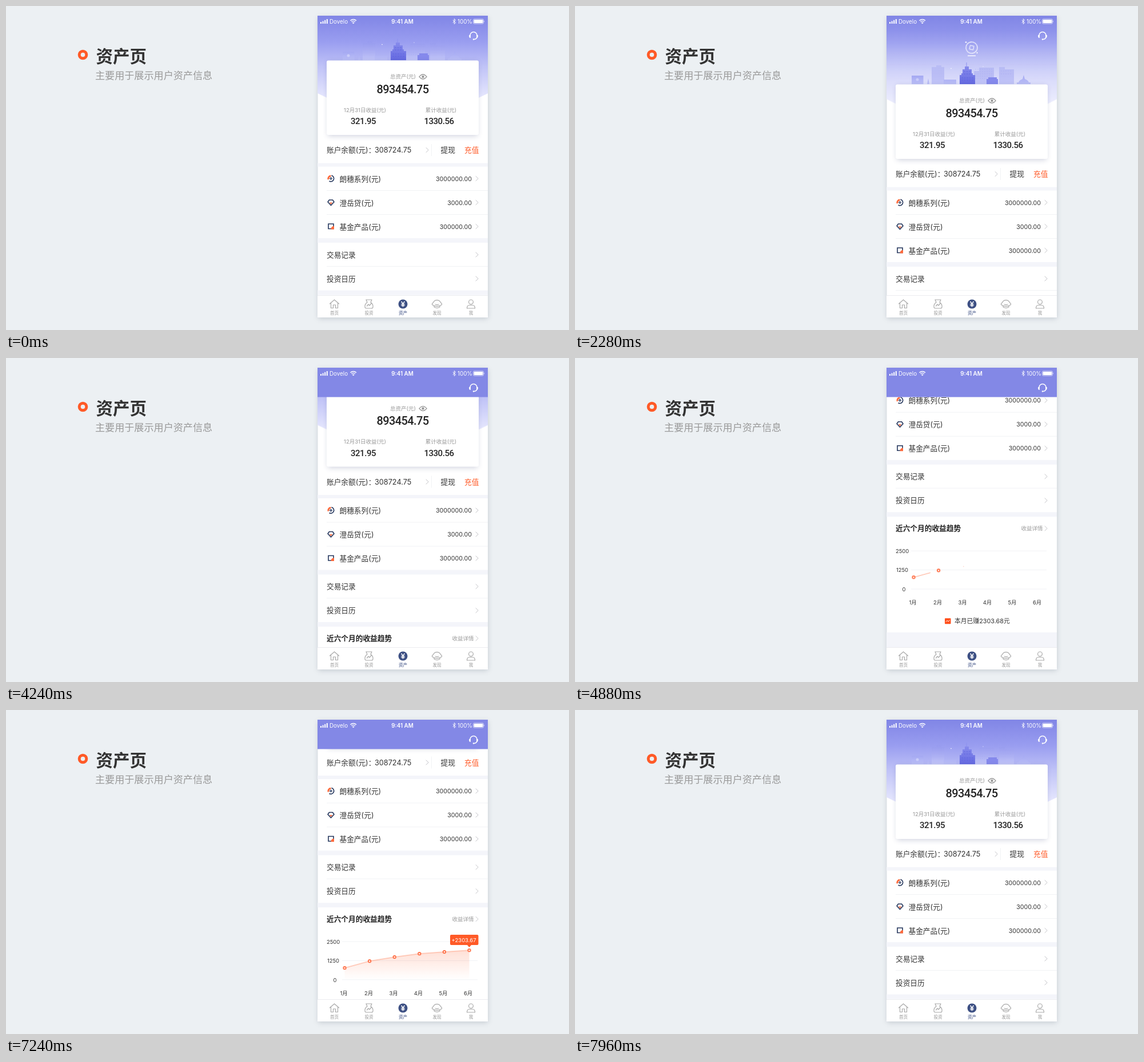
These frames come from a looping animation (985 px wide and 568 px high, 8.04 s). An HTML page:

```html
<!DOCTYPE html>
<html lang="zh-CN">
<head>
<meta charset="utf-8">
<title>资产页</title>
<style>
html, body { margin: 0; width: 100%; height: 100%; overflow: hidden; background: #ecf0f3; }
svg { display: block; }
#stage { width: 985px; height: 568px; }
text { font-family: Inter, "Noto Sans CJK SC", "Noto Sans CJK", sans-serif; font-size: 12.7px; fill: #333; }
.din { font: 500 15px Roboto, sans-serif; letter-spacing: -.03em; fill: #222; text-anchor: middle; }
.big { font-size: 20px; }
.num { font-size: 10.7px; text-anchor: end; }
.note { font-size: 9.5px; fill: #999; }
.mid { text-anchor: middle; }
.axis { font-size: 9.4px; text-anchor: middle; }
.status { font-size: 9.8px; fill: #fff; }
.tab { font-size: 7.6px; fill: #999; text-anchor: middle; }
.line { fill: none; stroke: #f1f2f5; }
.icon { fill: none; stroke: #a9a9a9; stroke-width: 1.2; stroke-linejoin: round; stroke-linecap: round; }
.white { fill: none; stroke: #fff; }
.mark { fill: none; stroke: #24365c; stroke-width: 1.6; }

/* one loop = 8040 ms; cubic-bezier below is smoothstep */
.a { animation: 8040ms cubic-bezier(.333, 0, .667, 1) infinite both; }
#scroll { animation-name: scroll; }
#sky { animation-name: sky; transform-origin: 694px 18px; }
#mist { animation-name: mist; }
#city { animation-name: city; transform-origin: 692px 95px; }
#bar { animation-name: bar; }
#loader { animation-name: loader; }
#ring { animation-name: ring; animation-timing-function: linear; }
#coin { animation-name: coin; }
#ground { animation-name: ground; }
.spark { animation-name: spark; }
.dot { animation-name: pop; transform-box: fill-box; transform-origin: center; }
#trend { animation-name: draw; animation-timing-function: linear; stroke-dasharray: 100; }
#area { animation-name: area; }
#tip { animation-name: tip; transform-origin: 810.5px 577px; }

@keyframes scroll {
  0%, 5.35% { transform: translateY(0); }
  11.2% { transform: translateY(50px); }
  15.42%, 37.19% { transform: translateY(42px); }
  42.29%, 50.27% { transform: translateY(0); }
  60.22%, 86.47% { transform: translateY(-228.3px); }
  96.42%, 100% { transform: translateY(0); }
}
@keyframes sky {
  0%, 5.35% { transform: translateY(0) scaleY(1); }
  11.2%, 15.92% { transform: translateY(0) scaleY(1.22); }
  25.87%, 37.19% { transform: translateY(0) scaleY(1.074); }
  42.29%, 50.27% { transform: translateY(0) scaleY(1); }
  60.22%, 86.47% { transform: translateY(-228.3px) scaleY(1); }
  96.42%, 100% { transform: translateY(0) scaleY(1); }
}
@keyframes mist {
  0%, 5.35% { opacity: 0; }
  11.2%, 15.92% { opacity: .75; }
  25.87%, 37.19% { opacity: .3; }
  42.29%, 100% { opacity: 0; }
}
@keyframes city {
  0%, 5.35% { transform: scale(1); }
  11.2%, 15.92% { transform: scale(1.04); }
  25.87%, 100% { transform: scale(1); }
}
@keyframes bar {
  0%, 50.2% { opacity: 0; }
  51.8%, 96.8% { opacity: 1; }
  99%, 100% { opacity: 0; }
}
@keyframes loader {
  0%, 5.35% { transform: translateY(-33.6px); opacity: 0; }
  11.2% { transform: translateY(6.4px); opacity: 1; }
  15.42%, 37.19% { transform: translateY(0); opacity: 1; }
  42.29%, 100% { transform: translateY(-33.6px); opacity: 0; }
}
@keyframes ring {
  0%, 5.35% { stroke-dasharray: 0 31.42; transform: rotate(-250deg); }
  11.94% { stroke-dasharray: 25 6.42; transform: rotate(-61deg); }
  15.92%, 100% { stroke-dasharray: 31.42 0; transform: rotate(60deg); }
}
@keyframes coin {
  0%, 15.92% { transform: rotate(-90deg) scale(0); }
  20.5%, 26.87% { transform: rotate(0deg) scale(1); }
  36.32%, 100% { transform: rotate(180deg) scale(1); }
}
@keyframes ground {
  0%, 19.5% { transform: scaleX(0); }
  25.87%, 100% { transform: scaleX(1); }
}
@keyframes spark {
  0%, 21% { opacity: 0; }
  25.87%, 29% { opacity: 1; }
  32% { opacity: .3; }
  36.32%, 100% { opacity: 1; }
}
@keyframes pop {
  0%, 57.59% { transform: scale(0); }
  59.45%, 100% { transform: scale(1); }
}
@keyframes draw {
  0%, 59.58% { stroke-dashoffset: 100; }
  67.79%, 100% { stroke-dashoffset: 0; }
}
@keyframes area {
  0%, 65.5% { opacity: 0; }
  70.65%, 100% { opacity: 1; }
}
@keyframes tip {
  0%, 67.79% { transform: scale(0); }
  70.65%, 100% { transform: scale(1); }
}
</style>
</head>
<body>
<svg id="stage" viewBox="0 0 985 568">
  <defs>
    <clipPath id="screen"><path d="M545.5 17.5h297.5v528.5h-297.5z"/></clipPath>
    <linearGradient id="dusk" gradientUnits="userSpaceOnUse" x1="0" y1="18" x2="0" y2="165">
      <stop stop-color="#8186e6"/><stop offset=".3" stop-color="#999df0"/><stop offset=".6" stop-color="#c0c3f7"/><stop offset="1" stop-color="#e9eafe"/>
    </linearGradient>
    <linearGradient id="fade" gradientUnits="userSpaceOnUse" x1="0" y1="40" x2="0" y2="125">
      <stop stop-color="#fff" stop-opacity="0"/><stop offset="1" stop-color="#fff"/>
    </linearGradient>
    <linearGradient id="tower" x2="0" y2="1"><stop stop-color="#8f93ee"/><stop offset="1" stop-color="#6469e1"/></linearGradient>
    <linearGradient id="block" x2="0" y2="1"><stop stop-color="#a3a7f2"/><stop offset="1" stop-color="#bcc0f7"/></linearGradient>
    <linearGradient id="haze" x2="0" y2="1"><stop stop-color="#9296ec" stop-opacity=".25"/><stop offset="1" stop-color="#c3c6f8"/></linearGradient>
    <linearGradient id="glow" x2="0" y2="1"><stop stop-color="#ff5a27" stop-opacity=".19"/><stop offset="1" stop-color="#ff5a27" stop-opacity="0"/></linearGradient>
    <filter id="soft" x="-20%" y="-20%" width="140%" height="140%"><feGaussianBlur stdDeviation="5"/></filter>
    <path id="chev" d="M-2.3-4.3L2.2 0-2.3 4.3" fill="none" stroke="#c4c4c8"/>
    <circle id="node" r="2.3" fill="#fff" stroke="#ff4f1c" stroke-width="1.4"/>
    <path id="shore" d="M545-60h298.500v213l-149 71-149.500-71z"/>
  </defs>

  <circle cx="134.5" cy="85.5" r="6.3" fill="none" stroke="#ff5a27" stroke-width="5"/>
  <text x="157.5" y="98.5" style="font-size:29.5px;font-weight:700">资产页</text>
  <text x="156" y="127.5" style="font-size:17.1px;fill:#999">主要用于展示用户资产信息</text>

  <path d="M546 20h297v528h-297z" filter="url(#soft)" fill="#6b7684" opacity=".3"/>
  <g clip-path="url(#screen)">
    <path d="M545 17h298v529h-298z" fill="#fff"/>
    <g id="sky" class="a">
      <use href="#shore" fill="url(#dusk)"/>
      <use id="mist" class="a" href="#shore" fill="url(#fade)"/>
    </g>

    <g id="loader" class="a">
      <g transform="translate(694 73)" class="white">
        <circle id="ring" class="a" r="10" stroke-width="1.2"/>
        <path id="coin" class="a" d="M-3.3-3.3h6.6v6.6h-6.6z"/>
        <path id="ground" class="a" d="M-7 14.3h14" stroke-width="1.3"/>
        <path class="a spark" d="M-11.5-9.5h3M-10-11v3M8.3 9h2.4M9.5 7.8v2.4"/>
      </g>
    </g>

    <g id="scroll" class="a">
      <g id="city" class="a">
        <path fill="url(#haze)" d="M624 95V65h8v-3h9v3h5v30zM698 95V72h9v-6h26v29zM742 95V65h10v4h16v26z"/>
        <path d="M700 69h31M700 73h31M700 77h31M700 81h31M700 85h18M745 72h20M745 77h20" stroke="#a3a7f3" stroke-dasharray="2 2" opacity=".45"/>
        <path fill="url(#block)" d="M589 95V80h20.500v15zM616 95l2-10 2 10zM645 95v-8h22v8zM773 95v-3h3q1-4 7-6l2-7 2 7q6 2 7 6h3v3z"/>
        <circle cx="599" cy="87" r="2.500" fill="#c9ccf9"/>
        <path fill="#8589ec" d="M720 95v-9h3v-3h15v3h2v9z"/>
        <path fill="url(#tower)" d="M673 95V79h3v-3h2V69h4v-5h2.500v-7h1v7h3.500v5h5v7h2v3h4v16z"/>
        <path d="M676 84h21M676 88h21M680 73h13M680 77h13" stroke="#5c60dc" stroke-width=".8" stroke-dasharray="3 1.500"/>
        <circle cx="658" cy="67.500" r=".8" fill="#fff"/><circle cx="714" cy="64" r=".6" fill="#fff"/>
      </g>

      <rect x="563" y="98" width="262" height="130" rx="3" filter="url(#soft)" fill="#59608c" opacity=".28"/>
      <rect x="561" y="95.500" width="266" height="130.500" rx="3" fill="#fff"/>
      <text class="note" x="672" y="127">总资产(元)</text>
      <path d="M723 124q6.500-8 13 0q-6.500 8-13 0z" fill="none" stroke="#999" stroke-width="1.300"/>
      <circle cx="729.500" cy="124" r="2.200" fill="#999"/>
      <text class="din big" x="694" y="152.700">893454.75</text>
      <text class="note mid" x="628" y="185.500">12月31日收益(元)</text>
      <text class="note mid" x="761" y="185.500">累计收益(元)</text>
      <text class="din" x="625" y="207.200">321.95</text>
      <text class="din" x="757.500" y="207.200">1330.56</text>

      <text x="561" y="257.200">账户余额(元)：</text>
      <text x="645" y="257.200">308724.75</text>
      <use href="#chev" x="737" y="252.500"/>
      <path class="line" d="M744.500 242v21"/>
      <text x="760.500" y="257.200">提现</text>
      <text x="802" y="257.200" style="fill:#ff5a27">充值</text>

      <path fill="#f4f5fa" d="M545 275.500h298v6h-298zM545 407h298v8h-298zM545 498.500h298v8h-298zM545 709.300h298v60h-298z"/>
      <path class="line" d="M561 323.500h282M561 365.500h282M561 456.500h282"/>

      <g transform="translate(568.500 302.500)">
        <path class="mark" d="M1-5.400A5.400 5.400 0 1 1-3 4.500"/>
        <path d="M-5.800 2A6 6 0 0 1 0-6L0-3A3 3 0 0 0-3 1z" fill="#ff6a3c"/>
        <path d="M0-2.600L2.600 0 0 2.600-2.600 0z" fill="#24365c"/><circle r=".8" fill="#fff"/>
      </g>
      <g transform="translate(568.500 344.500)">
        <path d="M-2.800 0h5.600L0 3.200z" fill="#ff6a3c"/>
        <path class="mark" d="M-3-4.500h6L5.500-1 0 5-5.500-1z" stroke-linejoin="round"/>
      </g>
      <g transform="translate(568.500 386.500)">
        <path class="mark" d="M-4.500-4.500h9v8.500h-9z"/>
        <path d="M5.500-.5v5.500h-5.500q0-5.500 5.500-5.500z" fill="#ff6a3c"/>
      </g>
      <text x="583.500" y="307.500">朗穗系列(元)</text>
      <text x="583.500" y="349.500">澄岳贷(元)</text>
      <text x="583.500" y="391.500">基金产品(元)</text>
      <text class="num" x="815" y="306.700">3000000.00</text>
      <text class="num" x="815" y="348.700">3000.00</text>
      <text class="num" x="815" y="390.700">300000.00</text>
      <text x="561" y="440.700">交易记录</text>
      <text x="561" y="482.700">投资日历</text>
      <use href="#chev" x="824" y="302.500"/><use href="#chev" x="824" y="344.500"/>
      <use href="#chev" x="824" y="386.500"/><use href="#chev" x="824" y="436"/>
      <use href="#chev" x="824" y="478"/><use href="#chev" x="824" y="527"/>

      <text x="561" y="531.700" style="font-weight:700;fill:#222">近六个月的收益趋势</text>
      <text class="note" x="780.500" y="530.500">收益详情</text>
      <path class="line" d="M588 566.500h237M588 599.800h237M588 633.300h237"/>
      <text class="axis" x="572.500" y="570">2500</text>
      <text class="axis" x="572.500" y="603.500">1250</text>
      <text class="axis" x="575.500" y="637">0</text>
      <g id="months"></g>
      <path id="area" class="a" fill="url(#glow)"/>
      <path id="trend" class="a" fill="none" stroke="#ffa184" pathLength="100"/>
      <g id="dots"></g>
      <g id="tip" class="a">
        <path d="M779 554.600h45.500a2 2 0 0 1 2 2v14a2 2 0 0 1-2 2h-10.500l-3.500 4-3.500-4h-28a2 2 0 0 1-2-2v-14a2 2 0 0 1 2-2z" fill="#ff5a27"/>
        <text id="gain" x="779.500" y="567.300" style="font-size:9.500px;fill:#fff">+2303.67</text>
      </g>
      <rect x="647" y="684.500" width="10.500" height="10" rx="1" fill="#ff4f1c"/>
      <path class="white" d="M648.800 691l2.300-2.500 2 1.800 2.800-2.600"/>
      <text x="664" y="693.800" style="font-size:10.800px">本月已赚2303.68元</text>
    </g>

    <path id="bar" class="a" d="M545 17h298v51.500h-298z" fill="#8388e6"/>
    <path d="M550 28h2v3h-2zM553.600 26.500h2v4.500h-2zM557.200 24.800h2v6.200h-2zM560.800 23h2v8h-2z" fill="#fff"/>
    <text class="status" x="566" y="30.700">Dovelo</text>
    <path class="white" stroke-width="1.400" d="M602.500 25.600q5.200-4.400 10.400 0M604.400 27.700q3.300-2.700 6.600 0"/>
    <path d="M605.700 29.300q2-1.500 4 0l-2 2z" fill="#fff"/>
    <text class="status mid" x="693.500" y="30.700" style="font-weight:600">9:41 AM</text>
    <path class="white" stroke-width=".9" d="M781.700 24.700l5 4.500-2.500 2.300v-9l2.500 2.300-5 4.500"/>
    <text class="status" x="790" y="30.700">100%</text>
    <rect class="white" x="817.500" y="22.800" width="18" height="8.400" rx="2" stroke-width=".6"/>
    <rect x="818.600" y="23.900" width="15.800" height="6.200" rx="1" fill="#fff"/>
    <path d="M836.300 25.500q1.500 1.500 0 3z" fill="#fff"/>
    <g transform="translate(818 52)">
      <path class="white" stroke-width="1.500" d="M-6 1v-1.500a6 6 0 0 1 12 0V1M6 3q-1 3-5 3.500"/>
      <path d="M-7.800-1h2.600v5h-1q-1.600-1-1.600-2.500zM7.800-1h-2.600v5h1q1.600-1 1.600-2.500z" fill="#fff"/>
      <circle cy="6.500" r="1.200" fill="#fff"/>
    </g>

    <path d="M545 507h298v39h-298z" fill="#fff"/>
    <path d="M545 507.500h298" stroke="#ececf0"/>
    <g class="icon">
      <path transform="translate(574.500 522.500)" d="M-8-.5L0-7.500 8-.5M-6-2v9h4V1.500h4V7h4v-9"/>
      <path transform="translate(635 522.500)" d="M-5-7.500h10l-2 4.500q4.500 3 4 8 0 2.500-2.500 2.500h-9q-2.500 0-2.500-2.500-.5-5 4-8zM-3.500 3.500L-1 .5l2 2L4-1"/>
      <g transform="translate(754 522.500)"><path d="M-6.500-2.500a7 7 0 0 1 13 0M-5.500 4.300a7 7 0 0 0 11 0M-6.500-2.500Q-10 0-7.500 1.800 0 6 7.500 1.800 10 0 6.500-2.500"/><path d="M-3 .5q3 1.200 6 0"/></g>
      <g transform="translate(813.500 522.500)"><circle cy="-3.600" r="3.900"/><path d="M-7 7.500q0-5.500 4.500-5.500h5q4.500 0 4.500 5.500z"/></g>
    </g>
    <circle cx="694.500" cy="522.500" r="8" fill="#3c4f83"/>
    <path class="white" stroke-width="1.400" d="M691.500 518l3 4 3-4M694.500 522v5.500M691.500 522.800h6M691.500 525.200h6"/>
    <text class="tab" x="574.500" y="541">首页</text>
    <text class="tab" x="635" y="541">投资</text>
    <text class="tab" x="694.500" y="541" style="fill:#3c4f83">资产</text>
    <text class="tab" x="754" y="541">发现</text>
    <text class="tab" x="813.500" y="541">我</text>
  </g>
</svg>
<script>
const $ = id => document.getElementById(id);
const heights = [612.7, 600.7, 593.6, 587.7, 584.6, 581.7];
const points = heights.map((y, i) => [592.5 + 43.6 * i, y]);
const path = 'M' + points.map(p => p.join(' ')).join('L');

$('trend').setAttribute('d', path);
$('area').setAttribute('d', path + 'V633.3H592.5z');
$('dots').innerHTML = points.map(([x, y], i) =>
  `<g transform="translate(${x} ${y})"><use href="#node" class="a dot" style="animation-delay:${105 * i}ms"/></g>`).join('');
$('months').innerHTML = points.map((p, i) =>
  `<text class="axis" x="${591 + 43.5 * i}" y="660.8">${i + 1}月</text>`).join('');

// The counter shares the clock of the scroll animation.
const clock = $('scroll').getAnimations()[0];
function count() {
  const t = (clock.currentTime || 0) % 8040;
  const p = Math.min(1, Math.max(0, (t - 5680) / 320));
  const value = 2303.67 * (1 - (1 - p) ** 2);
  $('gain').textContent = '+' + value.toFixed(2).padStart(7, '0');
  requestAnimationFrame(count);
}
count();
</script>
</body>
</html>
```
